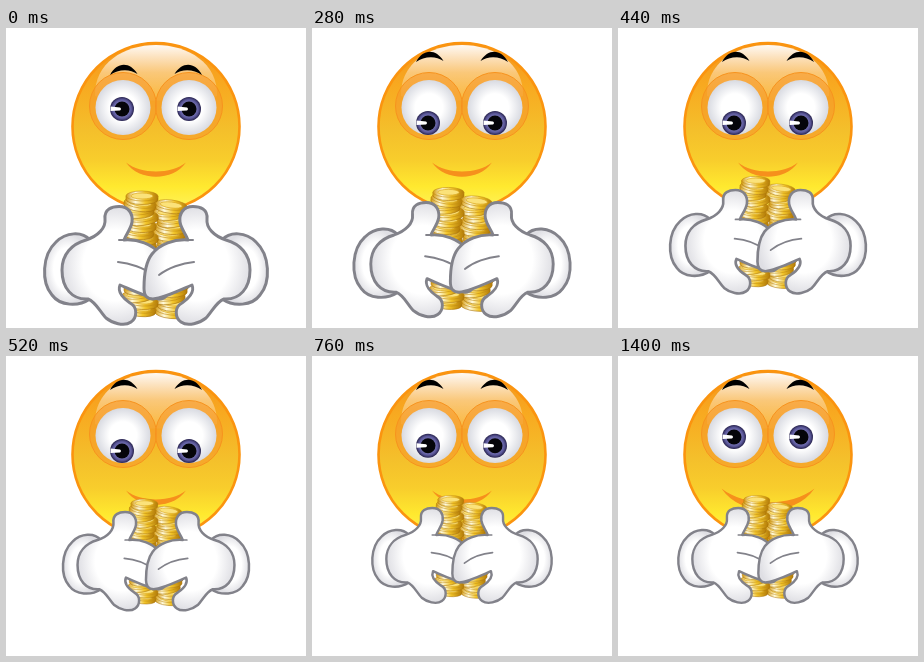
Animation of 300 by 300 pixels, one loop 3040 ms. Source, as an HTML page:

```html
<!DOCTYPE html>
<html lang="en">
<head>
<meta charset="utf-8">
<title>Smiley gathering coins</title>
<style>
html, body { margin: 0; width: 100%; height: 100%; overflow: hidden; background: #fff }
svg { display: block; width: 100%; height: 100% }
</style>
</head>
<body>
<svg viewBox="0 0 300 300">
  <defs>
    <linearGradient id="skin" x2="0" y2="1">
      <stop offset="0" stop-color="#f4941c"/>
      <stop offset=".25" stop-color="#f8a920"/>
      <stop offset=".52" stop-color="#f4bf2b"/>
      <stop offset=".7" stop-color="#f8cd2c"/>
      <stop offset=".86" stop-color="#ffe92f"/>
      <stop offset="1" stop-color="#fff45c"/>
    </linearGradient>
    <linearGradient id="gloss" x2="0" y2="1">
      <stop offset="0" stop-color="#fff" stop-opacity=".95"/>
      <stop offset=".5" stop-color="#fff" stop-opacity=".4"/>
      <stop offset="1" stop-color="#fff" stop-opacity=".12"/>
    </linearGradient>
    <radialGradient id="ball">
      <stop offset=".5" stop-color="#fff"/>
      <stop offset="1" stop-color="#d8dae1"/>
    </radialGradient>
    <radialGradient id="iris">
      <stop offset=".5" stop-color="#7f7cba"/>
      <stop offset=".78" stop-color="#5d5a9c"/>
      <stop offset="1" stop-color="#27224d"/>
    </radialGradient>
    <linearGradient id="gold">
      <stop offset="0" stop-color="#d49a10"/>
      <stop offset=".3" stop-color="#fffbe0"/>
      <stop offset=".6" stop-color="#f3c62a"/>
      <stop offset="1" stop-color="#b27a08"/>
    </linearGradient>
    <radialGradient id="glove">
      <stop offset=".6" stop-color="#fff"/>
      <stop offset="1" stop-color="#dfdfe4"/>
    </radialGradient>
    <g id="eye">
      <circle r="33.500" fill="#f79a2a" fill-opacity=".6" stroke="#f7931e"/>
      <circle cy="1.500" r="27.500" fill="url(#ball)"/>
    </g>
    <g id="pupil">
      <circle r="12" fill="url(#iris)"/>
      <circle r="7.500" fill="#05050a"/>
      <path d="M-11.500 -2.500L-2 -1.500Q0 0 -2 1.500L-11.500 2Z" fill="#fff"/>
    </g>
    <path id="brow" d="M104 34C111 20.500 124 20.500 131.500 33C124 27.500 112 28 104 34Z"/>
    <g id="coin">
      <path d="M-16 0V3.500A16 5 0 0 0 16 3.500V0Z" fill="url(#gold)" stroke="#a9730a" stroke-width=".6"/>
      <ellipse rx="16" ry="5" fill="url(#gold)" stroke="#c08a12" stroke-width=".6"/>
      <ellipse rx="11" ry="3" fill="#fbe27a" stroke="#dba823" stroke-width=".7"/>
    </g>
    <g id="hand" stroke="#82828a" stroke-width="3" stroke-linecap="round" stroke-linejoin="round">
      <path d="M84 212C76 203 60 204 50 214C36 227 35 254 46 267C54 278 72 279 84 271Z" fill="url(#glove)"/>
      <path d="M56 242C56 226 66 216 80 212C92 208 100 200 99 191C98 181 106 178.500 113 178.500C123 178.500 127 186 126 194C125 201 120 206 118 212C132 211 146 216 154 226C161 235 162 250 162 260C162 268 159 271 153 271C142 270 130 264 114 257C111 264 118 271 124 275C132 279 131 290 125 294C118 299 106 295 100 290C94 284 90 274 82 271C66 272 56 260 56 242Z" fill="url(#glove)"/>
      <path d="M112 234C124 235 138 240 147 247M118 212H113" fill="none" stroke-width="2"/>
    </g>
  </defs>

  <circle cx="150" cy="98.500" r="83.500" fill="url(#skin)" stroke="#fb940f" stroke-width="2.600"/>
  <path d="M89 68C88 35 118 17 150 17S212 35 211 68C195 74 105 74 89 68Z" fill="url(#gloss)"/>
  <use href="#eye" x="117" y="78"/>
  <use href="#eye" x="183" y="78"/>
  <use href="#pupil" id="pupilL"/>
  <use href="#pupil" id="pupilR"/>
  <g id="brows">
    <use href="#brow"/>
    <use href="#brow" transform="matrix(-1 0 0 1 300 0)"/>
  </g>
  <path id="mouth" d="M-30 0C-15 12 15 12 30 0C17 19 -17 19 -30 0Z" fill="#f6901c"/>
  <g id="grip">
    <g id="coins"></g>
    <use href="#hand"/>
    <use href="#hand" transform="matrix(-1 0 0 1 300 0)"/>
  </g>
</svg>
<script>
const LOOP = 3040, STEP = 40;
const $ = id => document.getElementById(id);
const place = (id, value) => $(id).setAttribute('transform', value);
const move = (id, x, y) => place(id, `translate(${x} ${y})`);
const mix = (a, b, u) => a + (b - a) * u;

// Progress between two times, with a gentle ease in and out.
function span(t, from, to) {
  const u = Math.min(1, Math.max(0, (t - from) / (to - from)));
  return u * (1 + 3 * u - 2 * u * u) / 2;
}

// Each stack is built upward so that upper coins overlap lower ones.
function stack(x, top, bottom) {
  let coins = '';
  for (let y = bottom, i = 0; y >= top; y -= 7, i++) {
    const dx = 2.5 * Math.sin(i * 2.1);
    coins += `<use href="#coin" transform="translate(${x + dx} ${y}) rotate(${7 * Math.sin(i * 1.7 + 1)})"/>`;
  }
  return coins;
}
$('coins').innerHTML = stack(165, 177, 282) + stack(134, 168, 280);

function draw(t) {
  const down = span(t, 0, 200);
  const lift = span(t, 200, 600);
  const up = span(t, 600, 1000);
  const smile = span(t, 1000, 1400);

  const pupilY = 81 + 14 * (down - up);
  move('pupilL', 116, pupilY);
  move('pupilR', 183, pupilY);
  move('brows', 0, mix(13, 0, down));

  place('mouth', `translate(150 ${mix(134.5, 132.5, smile)}) scale(${mix(1, 1.55, smile)})`);
  place('grip', `translate(150 ${mix(240, 201.5, lift)}) scale(${mix(1, .805, lift)}) translate(-150 -240)`);
}

const start = performance.now();
function tick() {
  const t = (performance.now() - start) % LOOP;
  draw(Math.floor(t / STEP) * STEP);
  requestAnimationFrame(tick);
}
tick();
</script>
</body>
</html>
```
